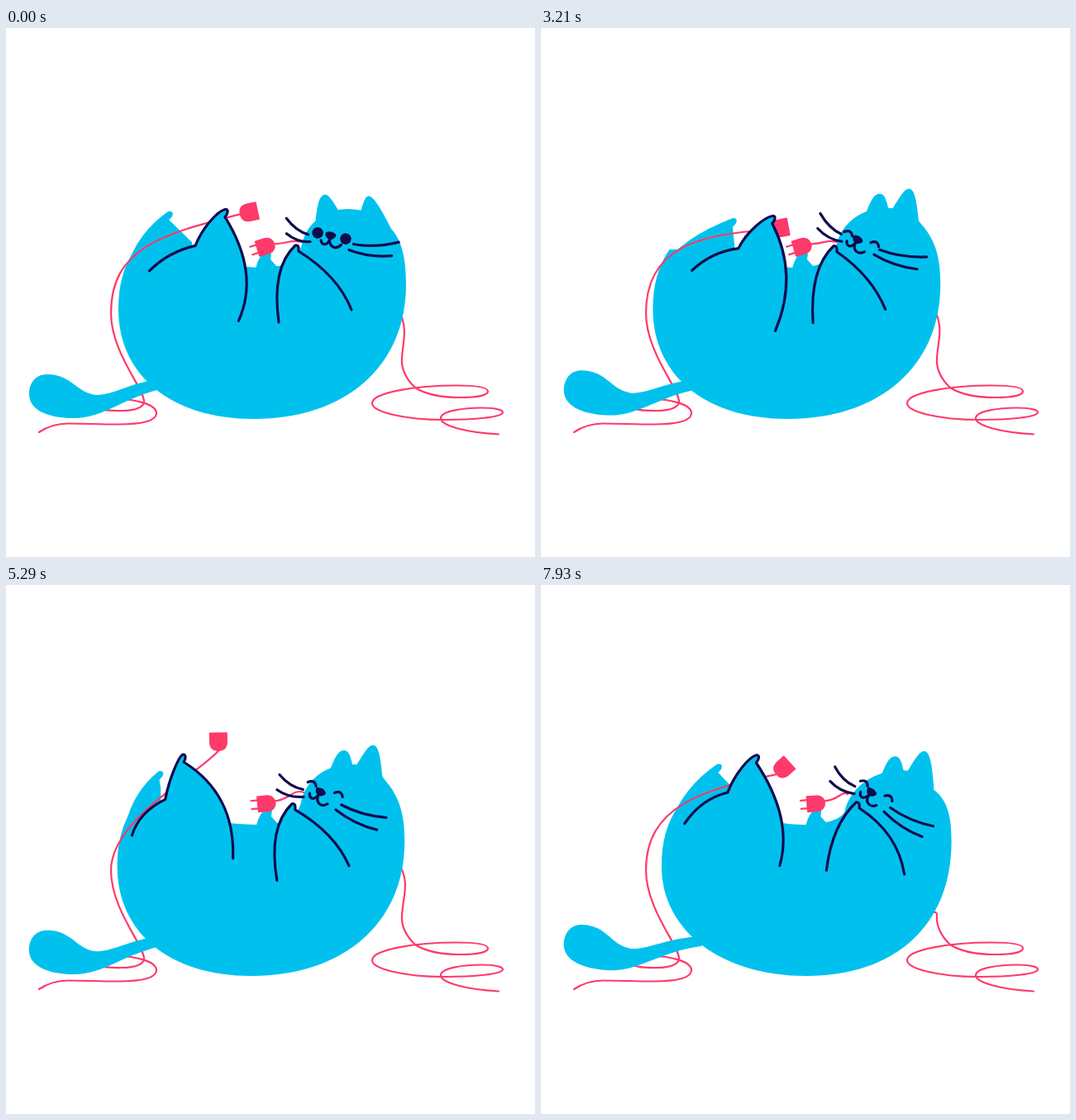
Animation, 640 px wide and 640 px high, one loop 8000 ms. Source, as an HTML page with a canvas:

```html
<!DOCTYPE html>
<html lang="en">
<head>
<meta charset="utf-8">
<title>Cat with plug</title>
<style>
  html, body { margin: 0; height: 100%; overflow: hidden; background: #fff; }
  canvas { display: block; width: 100vw; height: 100vh; }
</style>
</head>
<body>
<canvas id="stage" width="640" height="640"></canvas>
<script>
const ctx = document.getElementById('stage').getContext('2d');
const BLUE = '#00c1ee', NAVY = '#100c4c', PINK = '#fe3a6a';
const LOOP = 8000, KICK_START = 3290, KICK_END = 6890, KICK_PERIOD = 600;

const lerp = (a, b, u) => a + (b - a) * u;
const ease = u => (1 - Math.cos(Math.PI * u)) / 2;
const rad = deg => deg * Math.PI / 180;

// The whole pose follows from four controls: roll of the body, happy face, nod, height of the kick.
const keys = [
  { t: 0, roll: 0, happy: 0, nod: 0, kick: .24 },
  { t: 1210, roll: 1, happy: 0, nod: 0, kick: .04 },
  { t: 1600, roll: 1, happy: 0, nod: 0, kick: .04 },
  { t: 2430, roll: .3, happy: 0, nod: 1, kick: .26 },
  { t: KICK_START, roll: .05, happy: 1, nod: 0, kick: 0 },
  { t: KICK_END, roll: .05, happy: 1, nod: 0, kick: 0 },
  { t: 7250, roll: -.2, happy: 1, nod: 0, kick: .65 },
  { t: 7930, roll: -.9, happy: 1, nod: 0, kick: .3 },
  { t: LOOP, roll: -.9, happy: 1, nod: 0, kick: .3 }
];

function controlsAt(t) {
  const i = keys.findIndex((key, n) => t < keys[n + 1].t), a = keys[i], b = keys[i + 1];
  const u = ease((t - a.t) / (b.t - a.t));
  const c = { t };
  for (const name of ['roll', 'happy', 'nod', 'kick']) c[name] = lerp(a[name], b[name], u);
  if (t >= KICK_START && t < KICK_END) {
    c.kick = ease(2 * (t - KICK_START) / KICK_PERIOD);
    c.roll += .1 * c.kick;
  }
  c.turn = c.roll ** 2 * (1 - c.happy);
  c.lift = c.happy * (1 - (1 - c.kick) ** 4);
  return c;
}

function fill(d, color = BLUE) {
  ctx.fillStyle = color;
  ctx.fill(new Path2D(d));
}
function line(d, color = NAVY, width = 3.2) {
  ctx.strokeStyle = color;
  ctx.lineWidth = width;
  ctx.stroke(new Path2D(d));
}
function limb(d) {
  fill(d);
  line(d);
}
function shell(d) {
  fill(d, PINK);
  line(d, PINK, 2);
}
const cord = d => line(d, PINK, 2.2);

function at(x, y, degrees, draw) {
  ctx.save();
  ctx.translate(x, y);
  ctx.rotate(rad(degrees));
  draw();
  ctx.restore();
}

const neckOf = ({ roll, happy, nod }) =>
  [358 - lerp(24, 10, happy) * roll, 262 + 15 * Math.abs(roll) + 10 * nod];
const kneeOf = ({ roll, kick }) => [239 - 32 * kick - 39 * kick ** 2, 266 - 11 * kick + 13 * roll];

function drawRightCord({ roll }) {
  cord(`M596,491.5 C555,489 526,481 526,472 C526,463 556,459.5 575,459.5
    C590,459.5 601,461.5 601,465 C601,471 565,474 530,474 C480,474 443,464 443,454
    C443,441 495,432.5 545,432.5 C568,432.5 583,434.5 583,439.5 C583,444.5 570,447 550,447
    C520,447 504,441 495,435 C484,425 478,412 479,400
    C480,${378 - 13 * roll} ${487 + 23 * roll},${366 - 44 * roll} ${475 - 7 * roll},${340 - 44 * roll}`);
}

function drawPlug(c) {
  const x = 313 + 3 * c.happy - lerp(37, 17, c.happy) * c.roll, y = 264.5;
  const [nx] = neckOf(c), endY = 260 - 9 * c.lift;
  fill(`M${x - 11},291 Q${x - 7},275 ${x},272 L${x + 8},273 L${x + 7},280 L${x + 17},291 Z`);
  cord(`M${x + 10},${y - 3} C${x + 30},${y - 4} ${x + 32},${endY - 5} ${nx + 4},${endY}`);
  at(x, y, -17 + 60 * c.happy * c.kick * (1 - c.kick), () => {
    shell('M-9,-9 H2 C15,-9 15,9 2,9 H-9 Z');
    cord('M-17,-5 H-9 M-17,5 H-9');
  });
}

function drawFarLeg(c) {
  const { roll, happy, kick } = c, [kx, ky] = kneeOf(c);
  const left = 136 - 11 * roll;
  const x = lerp(199 - 4 * roll, 235 - 63 * kick, happy);
  const y = lerp(222, 230 - 8 * kick, happy) + 12 * roll;
  fill(`M${left + 10},290 Q${left + .36 * (x - left)},${y + .4 * (288 - y)} ${x - 3},${y}
    C${x + 4},${y - 2} ${x + 5},${y + 5} ${x - 2},${y + 10}
    L${kx - 4 - 12 * roll},${ky - 3 - 20 * kick ** 2} V290 Z`);
}

function drawBody(c) {
  const { roll, happy, nod } = c, [nx, ny] = neckOf(c), [kx, ky] = kneeOf(c);
  const left = 136 - 11 * roll, bottom = 300 - 23 * roll, right = 484 - 14 * roll;
  const top = [lerp(413 + 2 * roll, 418 - 19 * roll, happy), 219 - 7 * roll - happy];
  const raised = 6 * Math.max(happy, nod);
  const sx = 466 - 14 * roll - raised, sy = 243 - 10 * roll - raised;
  const [hx, hy] = top, w = hx - nx, h = ny - hy;
  fill(`M${kx},${ky} L${left + 20},268 C${left + 6},288 ${left},312 ${left},340
    C${left},420 ${bottom - 100},473 ${bottom},473 C${bottom + 110},473 ${right},410 ${right},310
    C${right},285 ${right - 3},259 ${sx},${sy} C${sx - 10},${sy - 16} ${hx + 20},${hy} ${hx},${hy}
    C${hx - .45 * w},${hy} ${nx + .1 * w},${ny - .63 * h} ${nx},${ny}
    C${nx - 6},284 ${nx - 24},290 ${nx - 50},290 Q${kx + 25},289 ${kx},${ky} Z`);
  at(hx, hy, 0, () => drawEars(c));
}

function drawEars({ turn, happy, nod }) {
  const perk = Math.max(turn, nod, happy);
  ear(-39 - 22 * turn + 16 * happy, 19 - 14 * happy,
    -29 - 29 * turn + 22 * happy, -17 - 5 * nod, -10 - 24 * turn + 14 * happy, 3);
  ear(16 - 52 * turn - 9 * happy, 3 - 2 * turn,
    28 - 59 * turn + 2 * happy, -15 - 8 * perk, 53 - 50 * turn - 13 * happy, 24 - 22 * turn - 6 * happy);
}

function ear(ax, ay, tx, ty, bx, by) {
  const len = Math.hypot(bx - ax, by - ay), dx = (bx - ax) / len * 7, dy = (by - ay) / len * 7;
  fill(`M${ax},${ay} C${lerp(ax, tx - dx, .6)},${lerp(ay, ty, .6)} ${tx - dx},${ty - dy} ${tx},${ty}
    C${tx + dx},${ty + dy} ${lerp(bx, tx, .5) + dx / 2},${lerp(by, ty, .5)} ${bx},${by}
    L${bx},${by + 14} L${ax + 4},${ay + 14} Z`);
}

function drawSocket({ roll, happy, kick, turn }) {
  const x = lerp(294 + 3 * turn, 290 - 41 * kick - 17 * roll, happy);
  const y = lerp(223 + 23 * turn, 243 - 71 * kick, happy);
  const angle = lerp(78 + 42 * turn, 80 - 107 * kick, happy), a = rad(angle);
  const swing = happy * kick ** 3;
  cord(`M40,489 C52,481 64,478.5 75,478.5 C95,478.5 115,479.5 135,479.5 C165,479.5 182,475 182,466
    C182,455 155,449 135,449 C118,449 108,452 108,456.5 C108,461 122,463.5 140,463
    C158,463 167,458 167,452 C167,436 127,392 127,345
    C127,${265 + 33 * happy * kick ** 2} ${191 + 22 * turn + 100 * swing},${249 - 22 * turn - 50 * swing}
    ${x - 11 * Math.sin(a)},${y + 11 * Math.cos(a)}`);
  at(x, y, angle, () => shell('M-10,-10 H10 V0 C10,8 5,10.5 0,10.5 S-10,8 -10,0 Z'));
}

function drawTail({ roll, happy, kick, turn }) {
  const raise = turn + happy * (.16 - .13 * kick - .15 * roll);
  at(170, 432, 15 * raise, () => fill(`M25,-9 C-18,-4 -40,12 -60,12 C-85,10 -90,-13 -120,-13
    C-135,-13 -142,-2 -142,11 C-142,30 -120,40 -88,40 C-50,40 -28,14 25,3 Z`));
}

function drawLeg(c) {
  const { roll, kick } = c, [kx, ky] = kneeOf(c), k2 = kick ** 2, drop = 13 * roll;
  const x = 283 - 52 * kick - 48 * k2, y = 227 - 31 * kick + drop;
  const w = x - kx, h = ky - y;
  limb(`M${183 - 40 * kick - 3 * roll},${293 + 16 * k2 + drop / 2} Q${kx - 32},${270 + 6 * k2 + drop} ${kx},${ky}
    C${kx + .22 * w},${ky - .5 * h} ${x - .3 * w},${y + .05 * h} ${x - 3},${y}
    C${x + 2},${y - 1} ${x + 1},${y + 5} ${x - 3 + 3 * k2},${y + 9}
    Q${312 - 8 * kick - 50 * k2},${298 + 20 * kick - 108 * k2 + drop} ${284 - 11 * kick - 9 * roll},${366 - 49 * kick + drop}`);
}

function drawArm({ roll, happy, lift }) {
  const low = Math.max(0, roll);
  const x = 352 + 6 * (happy - lift) - lerp(47, 33, happy) * roll, y = 263 + 14 * low;
  limb(`M${330 - 17 * roll},${356 + 12 * roll} Q${x - 31},${290 + 24 * low} ${x - 2},${y}
    C${x + 3},${y - 1} ${x + 2},${y + 4} ${x + 2},${y + 7}
    Q${402 - 33 * roll},300 ${418 - 24 * roll},${341 - 10 * roll}`);
}

function drawFace({ t, roll, happy, nod, lift }) {
  const x = lerp(394 + 7.5 * roll, 389 - 19 * roll, happy);
  const y = lerp(251.5 - 12.5 * roll + 14 * nod, 255 - 8.5 * lift, happy);
  const tilt = lerp(12 - 32 * roll, 23 - 9 * roll, happy);
  const droop = lerp(.55 - .35 * roll - .45 * nod, .55 + .45 * lift, happy);
  at(x, y, tilt, () => {
    for (const side of [-1, 1]) {
      at(17.3 * side, 0, 0, () => drawEye(t));
      for (const row of [0, 1]) whisker(side, row, droop, happy);
    }
    at(-1.5 - 3 * happy, 6 * droop * Math.max(happy, roll), 9 * happy, drawMouth);
  });
}

function drawEye(t) {
  if (t < 2250) fill('M-6.8,0 a6.8,6.8 0 1 0 13.6,0 a6.8,6.8 0 1 0 -13.6,0', NAVY);
  else if (t < 2850) line('M-5.5,-2 Q0,4 5.5,-1');
  else line('M-5.5,.5 Q1,-6 5.5,1.5');
}

function whisker(side, row, droop, happy) {
  const x1 = side * (28 - 4 * row - 3 * happy), y1 = -4 + 8 * row + 15 * droop;
  const x2 = side > 0 ? 81 - 5 * row : -58 + 4 * row, y2 = -27 + 18 * row + 32 * droop;
  line(`M${x1},${y1} Q${(x1 + x2) / 2},${(y1 + y2) / 2 + 6} ${x2},${y2}`);
}

function drawMouth() {
  fill('M-6,-3 Q0,-6.5 6,-3 Q8,0 3,4 Q0,6 -3,4 Q-8,0 -6,-3 Z', NAVY);
  line('M-10,8 C-8,13 -2,14 0,5 C2,15 11,15 15,8');
}

const layers = [drawRightCord, drawPlug, drawFarLeg, drawBody, drawSocket, drawTail, drawLeg, drawArm, drawFace];

function frame() {
  const controls = controlsAt((performance.now() - start) % LOOP);
  ctx.fillStyle = '#fff';
  ctx.fillRect(0, 0, 640, 640);
  ctx.lineCap = ctx.lineJoin = 'round';
  for (const draw of layers) draw(controls);
  requestAnimationFrame(frame);
}

const start = performance.now();
frame();
</script>
</body>
</html>
```
